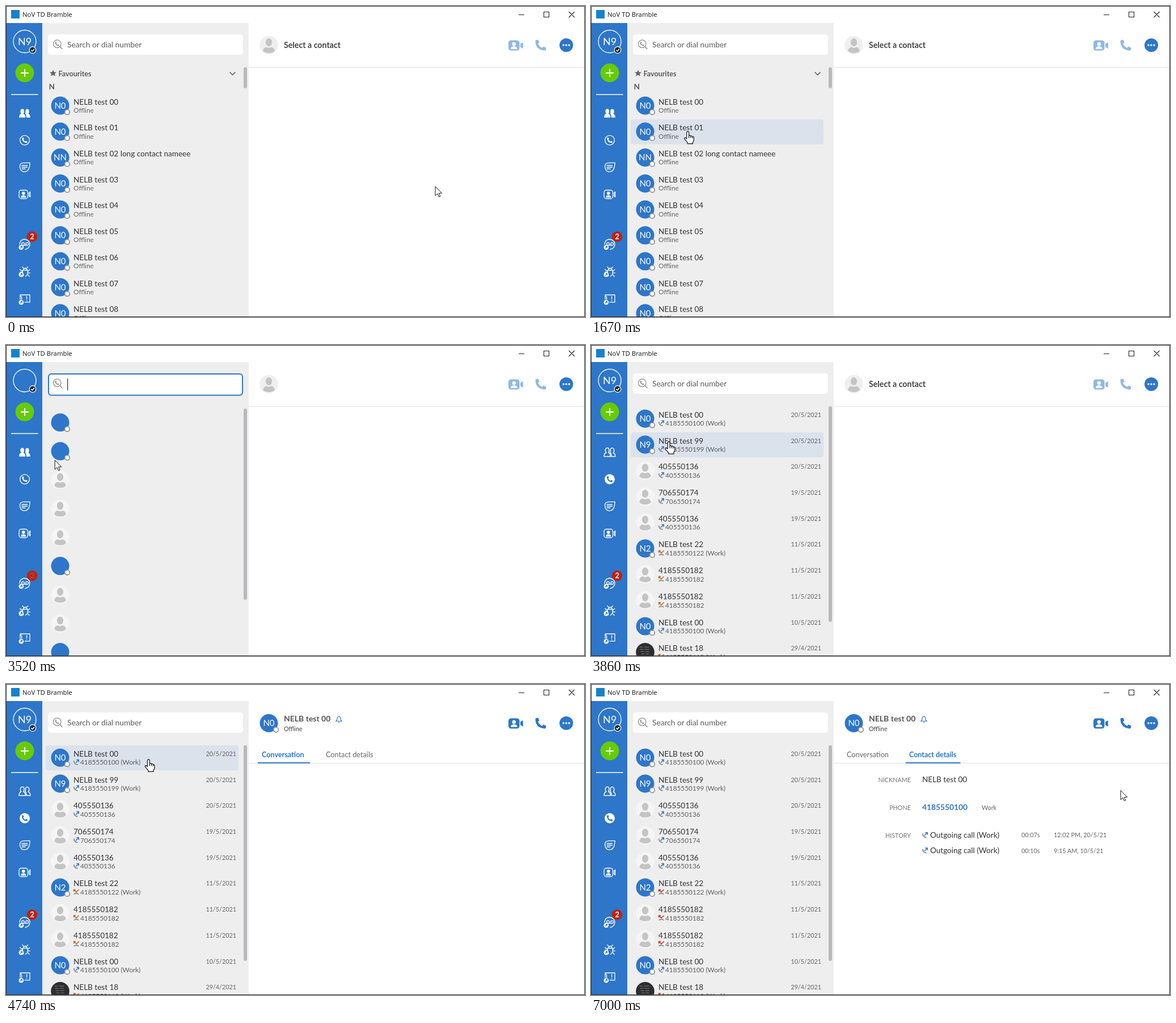
Recreate the animation shown at these times as an HTML page. Size 1021 by 548 pixels, loop 8 s.

```html
<!DOCTYPE html>
<html lang="en">
<head>
<meta charset="utf-8">
<title>Contacts and calls</title>
<style>
  html, body { margin: 0; width: 100%; height: 100%; overflow: hidden; background: #fff; }
  svg { display: block; width: 1021px; height: 548px; font-family: Lato, "Open Sans", sans-serif; --miss: #c8641e; }
  .line { fill: none; stroke: #fff; stroke-width: 1.3; stroke-linecap: round; stroke-linejoin: round; }
  .miss { stroke: var(--miss); }
  text { white-space: pre; }
</style>
</head>
<body>
<svg id="stage" viewBox="0 0 1021 548"></svg>
<script>
const LOOP = 8000, BLUE = '#2d76ca', PITCH = 45.72;

// ---- drawing helpers ----
const text = (x, y, s, size = 13.55, fill = '#333', more = '') =>
  `<text x="${x}" y="${y}" font-size="${size}" fill="${fill}" ${more}>${s}</text>`;
const rect = (x, y, w, h, fill, more = '') =>
  `<rect x="${x}" y="${y}" width="${w}" height="${h}" fill="${fill}" ${more}/>`;
const circle = (x, y, r, fill, more = '') =>
  `<circle cx="${x}" cy="${y}" r="${r}" fill="${fill}" ${more}/>`;
const path = (d, more = '') => `<path d="${d}" ${more}/>`;
const at = (x, y, body, scale = 1) => `<g transform="translate(${x} ${y}) scale(${scale})">${body}</g>`;
const on = (states, body) => `<g data-on="${states}">${body}</g>`;
const BOLD = 'font-weight="700"', MID = 'text-anchor="middle"', END = 'text-anchor="end"';

// ---- icons, centred on 0,0 ----
const HANDSET = 'M-8 -9L-4.5 -9.5L-2.5 -4.5L-5 -2.5Q-2.5 2.5 2.5 5L4.5 2.5L9.5 4.5L9 8Q8.5 9.5 7 9.5Q-9 8.5 -9.5 -7Q-9.5 -8.7 -8 -9Z';
const handset = fill => path(HANDSET, `fill="${fill}"`);

const dot = (x, y) => circle(x, y, 4.3, '#fff', 'stroke="#929292" stroke-width="1.7"');

const person = bg => circle(0, 0, 16.3, bg) +
  `<ellipse cx="0" cy="-5" rx="5.6" ry="7" fill="#c4c4c4"/>` +
  path('M-10.2 10.5Q-9.5 4 -4 3.6Q0 6 4 3.6Q9.5 4 10.2 10.5Q6 14 0 14Q-6 14 -10.2 10.5Z', 'fill="#c4c4c4"');

const badge = letters => circle(0, 0, 16, BLUE) +
  text(0, 5.3, letters, 15, '#fff', MID) + dot(12.5, 11.5);

const photo = circle(0, 0, 16.3, '#2d2d2f') +
  [-9, -5, -1, 3].map((y, i) => path(`M${-10 + i} ${y}h6m2 0h${9 - i}`, 'stroke="#7d7d7d"')).join('');

const outgoing = path('M-4.3 -2.6Q-4 3.6 2.6 4.4', 'fill="none" stroke="#929292" stroke-width="2"') +
  path('M-1 1L4 -4M.3 -4.2H4.2V-.3', `fill="none" stroke="${BLUE}" stroke-width="1.5"`);
const missed = path('M-4.3 4.2Q0 .6 4.3 4.2', 'fill="none" stroke="#929292" stroke-width="1.8"') +
  path('M-4.4 -.6V-4H-1M-4.4 -4L0 .2L4.6 -4.2', 'class="miss" fill="none" stroke-width="1.5"');

const camera = (fill, hole) => rect(-13, -9, 19.5, 18, fill, 'rx="4.5"') +
  circle(-3.2, -2.5, 3.2, hole) + path('M-9.2 6.2Q-8.5 1.6 -3.2 1.6Q2 1.6 2.8 6.2Z', `fill="${hole}"`) +
  path('M8 -2.8L12.8 -5.6V5.6L8 2.8Z', `fill="${fill}"`);

const bell = path('M-5 3Q-3 1.5 -3 -1.5Q-3 -5 0 -5Q3 -5 3 -1.5Q3 1.5 5 3ZM-1.3 5.2H1.3M0 -5V-6.2',
  `fill="none" stroke="${BLUE}" stroke-width="1.2"`);

const duo = more => path('M-9.3 7.5Q-9.3 2 -5.8 1.2Q-8 -1.5 -7 -4.5Q-6 -7 -3.8 -6.8Q-1 -6.5 -1 -3Q-1 -.5 -2.2 1.2Q1.2 2.4 1.2 7.5Z', more) +
  path('M2.8 7.5H9.3Q9.3 2.4 6 1.4Q8 -1.2 7 -4.6Q6 -7.2 3.4 -6.6Q1.6 -6 1.2 -4Q1.8 -1 .8 .8Q2.8 2.8 2.8 7.5Z', more);

const link = circle(-6.2, 5.2, 4.3, '#fff') +
  path('M-8 7L-4.6 3.5M-7.2 3.4H-4.5V6.2', `fill="none" stroke="${BLUE}" stroke-width="1.1"`);

// ---- data ----
const contacts = [0, 1, 2, 3, 4, 5, 6, 7, 8].map(i =>
  [i === 2 ? 'NN' : 'N0', `NELB test 0${i}` + (i === 2 ? ' long contact nameee' : '')]);
const calls = [
  ['N0', 'NELB test 00', '4185550100 (Work)', '20/5/2021'],
  ['N9', 'NELB test 99', '4185550199 (Work)', '20/5/2021'],
  ['', '405550136', '405550136', '20/5/2021'],
  ['', '706550174', '706550174', '19/5/2021'],
  ['', '405550136', '405550136', '19/5/2021'],
  ['N2', 'NELB test 22', '4185550122 (Work)', '11/5/2021', 1],
  ['', '4185550182', '4185550182', '11/5/2021', 1],
  ['', '4185550182', '4185550182', '11/5/2021', 1],
  ['N0', 'NELB test 00', '4185550100 (Work)', '10/5/2021'],
  ['*', 'NELB test 18', '4185550118 (Work)', '29/4/2021', 1]
];
const face = a => a === '*' ? photo : a ? badge(a) : person('#f5f5f5');

// ---- parts ----
const frame = rect(0, 0, 1021, 548, '#fff') + rect(64, 30, 364, 518, '#eee') + rect(0, 30, 64, 518, BLUE);

const titleBar = rect(9, 7, 15, 15, '#1683cc') +
  text(29, 19, 'NoV TD Bramble', 11.4, '#111', 'font-family="Open Sans, Noto Sans, sans-serif"') +
  path('M904 15.5H914M948.5 10.5H957.5V19.5H948.5ZM992.5 10L1002.5 20M1002.5 10L992.5 20', 'fill="none" stroke="#222" stroke-width="1.1"');

const TEXTED = 'contacts calls chat details', CALLS = 'calls chat loadB details';

const sideBar = circle(33, 62.5, 20, 'none', 'stroke="#fff" stroke-width="1.3"') +
  on(TEXTED, text(33, 69, 'N9', 18, '#fff', MID)) +
  circle(47, 77.5, 5.8, '#142a36', 'stroke="#fff" stroke-width="1.2"') +
  path('M44.2 77.5L46.4 79.7L50 75.6', 'id="tick" fill="none" stroke="#fff" stroke-width="1.6"') +
  circle(33, 117.8, 16.5, '#66cc00') + path('M26 118H40M33 111V125', 'stroke="#fff" stroke-width="2"') +
  path('M9 156H56.5', 'stroke="#fff" stroke-width="1.3"') +
  circle(33, 284, 20.5, 'rgba(255,255,255,.18)', 'id="ring" stroke="rgba(255,255,255,.45)" stroke-width="1.6"') +
  at(33, 188.5, on('contacts loadA', duo('fill="#fff"')) + on(CALLS, duo('class="line"')), 1.06) +
  at(33, 236.5,
    on('contacts loadA', circle(0, 0, 8.4, 'none', 'class="line"') + `<g transform="scale(.5)">${handset('#fff')}</g>`) +
    on(CALLS, circle(0, 0, 9, '#fff') + `<g transform="scale(.54)">${handset(BLUE)}</g>`)) +
  at(33, 284, path('M-8.5 -1Q-9 -7 -2 -7.6H9.3L8.2 0Q6.5 8 -1 8.2Q-8 7.5 -8.5 -1ZM-5 -3H4.5M-5 0H4.5M-5 3H1', 'class="line"')) +
  at(33, 332, `<rect x="-10" y="-7.5" width="15.5" height="15" rx="4" class="line"/>` +
    circle(-2.3, -2, 2.8, '#fff') + path('M-7 5.4Q-6.5 1.6 -2.3 1.6Q2 1.6 2.5 5.4Z', 'fill="#fff"') +
    path('M7.8 -3L9.6 -4.6V4.6L7.8 3Z', 'class="line"')) +
  at(33, 420, path('M-9 0Q-8.6 -8 -1 -9Q8.5 -8.4 9 -1Q9 7 1 9', 'class="line"') +
    circle(-3, -.8, 2.4, 'none', 'class="line"') + circle(4.2, -.8, 2.4, 'none', 'class="line"') +
    path('M-2.5 1.7H4.2', 'class="line"') + link) +
  at(33, 468, path('M-2 7.5Q-4.5 4 -3.5 -2.5H5Q6.5 5 1.5 8.2M-2.2 -3Q-1.8 -6 .8 -6Q3.4 -6 3.8 -3M-2 -6L-4.2 -8.4M3.4 -6L5.6 -8.4M-4 -.5L-8.4 -3.6M5.6 -.5L8.8 -3.6M6 2.4H9.4M5.2 5L8.2 8.6M-4.2 1H-8', 'class="line"') + link) +
  at(33, 517, path('M-8 0V-8H9V4.8H0M-8 -8L-5.4 -4V0', 'class="line"') +
    path('M3.5 -5.4V-.6M3.5 1.8V2.4', 'class="line" stroke-width="1.8"') + link) +
  circle(46, 406.5, 9.3, '#c0230f') +
  on(TEXTED, text(46, 411, '2', 12.5, '#fff', `${MID} ${BOLD}`)) +
  on('loadA', text(46, 411, '2', 12.5, '#92544c', `${MID} ${BOLD}`));

const search =
  on(TEXTED, rect(74, 50, 344, 36, '#fff', 'rx="5"') + text(108, 73, 'Search or dial number', 13.75, '#5c5c5c')) +
  on('loadB', rect(74, 50, 344, 39.5, '#fff', 'rx="5"')) +
  on('loadA', rect(75, 51, 342, 37.5, '#fff', `rx="5" stroke="${BLUE}" stroke-width="2"`) +
    rect(108, 59, 1.3, 21, '#1c4a48')) +
  at(91, 67.5, circle(-.8, -.8, 6.8, 'none', 'stroke="#8c8c8c" stroke-width="1.2"') +
    path('M4.2 4.2L8.4 8.6', 'stroke="#8c8c8c" stroke-width="1.5"') +
    `<g transform="translate(-.8 -.8) scale(.38)">${handset('#8c8c8c')}</g>`);

const bar = (y, h) => rect(419, y, 6, h, '#b9b9bd', 'rx="3"');

const contactList = path('M0 -6L1.7 -2L6 -1.7L2.7 1.1L3.8 5.3L0 3L-3.8 5.3L-2.7 1.1L-6 -1.7L-1.7 -2Z', 'transform="translate(83 118.5)" fill="#626262"') +
  text(92.5, 123.5, 'Favourites', 12.6, '#5c5c5c', BOLD) +
  path('M394.5 116.5L399.5 121.5L404.5 116.5', 'fill="none" stroke="#555" stroke-width="1.5"') +
  text(75.5, 147, 'N', 13.8, '#5c5c5c', BOLD) +
  contacts.map(([a, name], i) => at(0, 175.5 + i * PITCH,
    at(95.5, 0, face(a)) + text(119, -2, name) + text(119, 12.4, 'Offline', 11.8, '#666'))).join('') +
  bar(108, 37);

const callList = calls.map(([a, name, sub, date, miss], i) => at(0, 129.8 + i * PITCH,
  at(95.5, 0, face(a)) + text(119, -2, name) + at(124, 8, miss ? missed : outgoing) +
  text(131, 12.7, sub, 11.8, '#5e5e5e') + text(406, -3, date, 10.8, '#666', END))).join('') + bar(108, 380);

const bareList = calls.slice(0, 9).map(([a, , , , miss], i) => at(0, 136.5 + i * 50.57,
  at(95.5, 0, a ? circle(0, 0, 16, BLUE) + dot(12.5, 11.5) : person('#f5f5f5')) +
  on('loadB', at(124, 9.5, miss ? missed : outgoing)))).join('') + bar(112, 337);

const rule = y => rect(428, y, 592, 1, '#e1e1e1');
const buttons = fill => at(899, 69.5, camera(fill, '#fff')) + at(943, 69, handset(fill));

const header =
  on('contacts loadA calls', at(463.5, 69, person('#efefef')) + buttons('#92b8e4') + rule(108)) +
  on('contacts calls', text(490, 74, 'Select a contact', 14.2, '#444', BOLD)) +
  on('chat loadB details', buttons(BLUE)) +
  on('chat details', at(463.5, 69, badge('N0')) + text(490, 66, 'NELB test 00', 14, '#555', BOLD) +
    text(490, 83.3, 'Offline', 10.8, '#444') + at(587, 62.5, bell) + rule(139)) +
  on('loadB', circle(463.5, 69, 16, BLUE) + dot(476, 80.5) + at(596, 62, bell) + rule(143) +
    rect(444, 142, 98, 2, BLUE) + rect(563, 112, 105.5, 31, 'none', `stroke="${BLUE}" stroke-width="2"`) +
    at(589, 276, outgoing) + at(589, 310, outgoing)) +
  on('chat', text(451, 129, 'Conversation', 12.6, BLUE, BOLD) + rect(444, 138, 92, 2, BLUE) +
    text(564, 129, 'Contact details', 12.7, '#666')) +
  circle(988, 69, 12, BLUE) + [-5, 0, 5].map(d => circle(988 + d, 69, 1.7, '#fff')).join('');

const label = (y, s) => text(564, y, s, 10.8, '#757575', END);
const historyRow = (y, len, when) => at(589, y - 4.7, outgoing) + text(598, y, 'Outgoing call (Work)') +
  text(759, y - .3, len, 10.8, '#666') + text(816, y - .3, when, 10.8, '#666');

const details = text(451, 129, 'Conversation', 12.7, '#666') +
  text(561, 129, 'Contact details', 12.5, BLUE, BOLD) + rect(555, 138, 96.5, 2, BLUE) +
  rect(554, 112, 99, 27, 'none', `id="focus" stroke="${BLUE}" stroke-width="2"`) +
  label(173, 'NICKNAME') + text(584, 173.3, 'NELB test 00') +
  label(221.7, 'PHONE') + text(584, 222, '4185550100', 13.8, BLUE, BOLD) + text(689, 221.7, 'Work', 10.8, '#666') +
  label(270.5, 'HISTORY') + historyRow(270.7, '00:07s', '12:02 PM, 20/5/21') + historyRow(298, '00:10s', '9:15 AM, 10/5/21');

const pointer =
  path('M0 0V16.3L3.9 12.8L6.4 18.4L8.8 17.4L6.4 11.9H11.6Z', 'id="arrow" fill="#fff" stroke="#111" stroke-linejoin="round"') +
  path('M-2 12.5V1.8A1.9 1.9 0 0 1 1.8 1.8V7.5Q3.6 6.3 5 8Q6.8 7.2 8 9Q10.6 8.6 10.6 11V15.5L8.7 19V21.5H-.5V19.5L-6 13Q-6.6 10.6 -4.4 10.8ZM1.8 8V11.5M5 8.5V11.5M8 9.5V12',
    'id="hand" fill="#fff" stroke="#111" stroke-width="1.2" stroke-linejoin="round"');

const $ = id => document.getElementById(id);
$('stage').innerHTML = frame + titleBar + sideBar + search +
  rect(70, 0, 340, 44, '#dbe2ec', 'id="hover" rx="4"') +
  rect(71.5, 109, 338, 42, '#8fb1db', `id="picked" rx="3" stroke="${BLUE}" stroke-width="2"`) +
  on('contacts', contactList) + on('calls chat details', callList) + on('loadA loadB', bareList) +
  header + on('details', details) +
  path('M.5 .5H1020.5V547.5H.5Z', 'fill="none" stroke="#2b2b2b"') + `<g id="pointer">${pointer}</g>`;

// ---- timing ----
const STATES = [[0, 'contacts'], [3240, 'loadA'], [3800, 'calls'], [4530, 'chat'], [5630, 'loadB'], [5740, 'details']];
const ROUTE = [ // time, x, y
  [0, 757, 318], [1250, 757, 318], [1670, 171, 221], [2010, 112, 284], [2380, 38, 286], [2630, 35, 270],
  [2840, 33, 240], [3200, 34, 237], [3520, 86, 203], [4200, 188, 138], [4400, 191, 136.5], [4640, 194, 136],
  [5360, 603, 114], [5430, 607, 111], [5620, 607, 111], [5630, 607, 122.5], [6180, 607, 122.5],
  [6560, 800, 160], [6930, 929, 186], [7000, 934, 187.5], [LOOP, 934, 187.5]
];
const show = (el, yes) => { el.style.display = yes ? '' : 'none'; };
const layers = [...document.querySelectorAll('[data-on]')].map(el => [el, el.dataset.on.split(' ')]);

function place(t) {
  const i = ROUTE.findIndex(k => k[0] > t), [t0, x0, y0] = ROUTE[i - 1], [t1, x1, y1] = ROUTE[i];
  const p = (t - t0) / (t1 - t0);
  return [x0 + (x1 - x0) * p, y0 + (y1 - y0) * p];
}

function draw(t) {
  const state = STATES.filter(s => s[0] <= t).pop()[1];
  const [x, y] = place(t);
  layers.forEach(([el, list]) => show(el, list.includes(state)));

  const loading = state.startsWith('load');
  const top = state === 'contacts' ? 154 : 108.3;
  const row = Math.floor((y - top) / PITCH);
  const overRow = !loading && x > 70 && x < 410 && row >= 0;
  const icon = [188.5, 236.5, 284, 332].find(c => Math.hypot(x - 33, y - c) < 21);
  const overTab = t > 4530 && x > 555 && x < 655 && y > 108 && y < 140;
  const picked = t >= 4330 && t < 4600;

  show($('hover'), overRow && !picked);
  $('hover').setAttribute('y', top + row * PITCH);
  show($('picked'), picked);
  show($('ring'), icon !== undefined);
  if (icon) $('ring').setAttribute('cy', icon);
  show($('focus'), t < 6250);
  $('tick').setAttribute('stroke', state === 'contacts' ? '#f3f08c' : '#fff');
  $('stage').style.setProperty('--miss', t < 5630 ? '#c8641e' : '#c8301f');

  const hand = overRow || icon !== undefined || overTab;
  show($('hand'), hand);
  show($('arrow'), !hand);
  $('pointer').setAttribute('transform', `translate(${x.toFixed(1)} ${y.toFixed(1)})`);
}

const start = performance.now();
function tick() {
  draw((performance.now() - start) % LOOP);
  requestAnimationFrame(tick);
}
tick();
</script>
</body>
</html>
```
